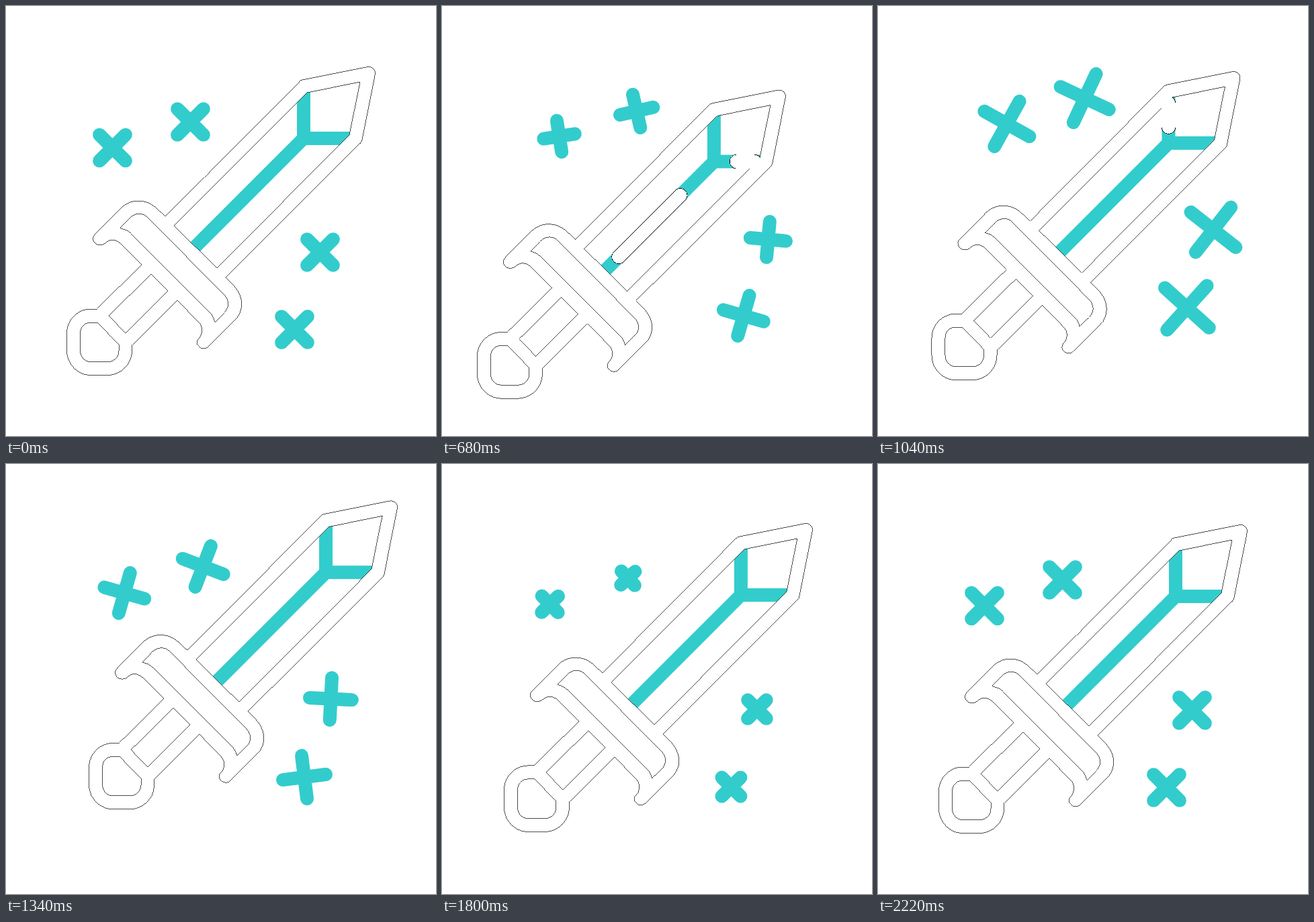
An HTML page for the animation above (2.26 s loop, 640 by 640 pixels).

```html
<!DOCTYPE html>
<html lang="en">
<head>
<meta charset="utf-8">
<title>Sword</title>
<style>
  html, body { margin: 0; width: 100%; height: 100%; overflow: hidden; background: #fff; }
  svg { display: block; width: 100vw; height: 100vh; }
  .teal { fill: none; stroke: #33cccc; stroke-width: 20; }
  .line { fill: none; stroke: #000; stroke-width: .7; shape-rendering: crispEdges; }
  .rim, .glint { fill: none; stroke-linecap: round; stroke-linejoin: round; shape-rendering: crispEdges; }
  .rim { stroke: #000; stroke-width: 21.6; }
  .glint { stroke: #fff; stroke-width: 20.4; }
  .spark { stroke-linecap: round; }
</style>
</head>
<body>
<svg viewBox="0 0 640 640">
  <defs>
    <clipPath id="blade"><path d="M250 327 448 129 527 113 511 192 314 390Z"/></clipPath>
  </defs>
  <g id="sword">
    <g clip-path="url(#blade)">
      <path class="teal" d="M443 120V197H520M270 370 443 197"/>
      <path class="rim" data-glint="0" d="M285 355 443 197"/>
      <path class="rim" data-glint="1" d="M503 197H443V138"/>
    </g>
    <g class="line">
      <!-- blade -->
      <path d="M237 313 436 112.500Q438 110.500 441 110L538 90.700C545 89.500 550.500 95 549.300 102L530 199Q529.500 202 527.500 204L327 404"/>
      <path d="M250 327 448 129 527 113 511 192 314 390Z"/>
      <!-- guard -->
      <path d="M327 404 337 414C354 431 355 453 341 467L301 507C292 515 280 504 286 496C294 488 293 477 287 471L255 438"/>
      <path d="M202 385 172 355C165 348 157 346 150 351C141 360 129 355 129.500 345Q130 342 133 339L168 304C183 286 208 286 224 301L237 313"/>
      <path d="M210 314 325 430C333 439 332 449 325 456L310.500 470Q309 461 302 455L186 339Q179 332 170 330.500L184 316C191 308 203 307 210 314Z"/>
      <!-- grip -->
      <path d="M202 385 136 450M255 438 189 504M216 399 153 461 178 487 241 424Z"/>
      <!-- pommel -->
      <path d="M136 451H126C106 451 90.500 468 90.500 487V513C90.500 533 107 549.500 126 549.500H151C171 549.500 187.500 533 187.500 513L188 504"/>
      <path d="M126 471H136L168 504V513C168 522 161 529.500 152 529.500H126C117 529.500 110.500 522 110.500 513V487C110.500 478 117 471 126 471Z"/>
    </g>
    <path class="glint" data-glint="0" d="M285 355 443 197"/>
    <path class="glint" data-glint="1" d="M503 197H443V138"/>
  </g>
  <g id="sparks"></g>
</svg>
<script>
const LOOP = 2260;
const smooth = (t, a, b) => {
  const x = Math.min(1, Math.max(0, (t - a) / (b - a)));
  return x * x * (3 - 2 * x);
};

// Monotone cubic curve through [time, value] keys, flat at both ends.
function track(keys) {
  const n = keys.length;
  const rise = i => (keys[i + 1][1] - keys[i][1]) / (keys[i + 1][0] - keys[i][0]);
  const slope = keys.map((k, i) => {
    if (i === 0 || i === n - 1) return 0;
    const a = rise(i - 1), b = rise(i);
    return a * b > 0 ? 2 * a * b / (a + b) : 0;
  });
  return t => {
    if (t <= keys[0][0]) return keys[0][1];
    if (t >= keys[n - 1][0]) return keys[n - 1][1];
    let i = 0;
    while (t > keys[i + 1][0]) i++;
    const [t0, v0] = keys[i], [t1, v1] = keys[i + 1];
    const h = t1 - t0, x = (t - t0) / h, y = 1 - x;
    return v0 * y * y * (1 + 2 * x) + v1 * x * x * (3 - 2 * x)
      + h * x * y * (slope[i] * y - slope[i + 1] * x);
  };
}

// Sword: pull back, thrust, settle.
const BACK = 735, THRUST = 1435;
const LOW = [-43, 39], HIGH = [37, -39.5];
const pull = track([[235, 0], [360, 0.102], [540, 0.585], [680, 0.885], [BACK, 1]]);
const settle = track([[THRUST, 1], [1500, 0.82], [1560, 0.64], [1620, 0.453], [1800, 0.053], [1870, 0]]);
function swordAt(t) {
  if (t < BACK) return LOW.map(v => v * pull(t));
  if (t > THRUST) return HIGH.map(v => v * settle(t));
  const p = smooth(t, BACK, THRUST);
  return LOW.map((v, i) => v + (HIGH[i] - v) * p);
}

// Glints: path length, head start/end, tail start/end.
const glints = [
  { len: 223, head: [500, 790], tail: [630, 885] },
  { len: 119, head: [560, 960], tail: [800, 1175] }
];

// Sparks: dip = time of smallest size, top = time of widest turn, rest = end of turn.
const sparks = [
  { x: 158.5, y: 211, dip: 460, top: 1160, rest: 1840, low: 1710,
    turn: [-65, -54, -16, -8, -29], size: [14.9, 23.5, 38.4, 39.2, 31.2, 17.2], move: [4, 17, 35.5, 36.3, 19, 2.3] },
  { x: 274.5, y: 172.5, dip: 480, top: 1180, rest: 1860, low: 1740,
    turn: [-58, -58, -20, -10, -24], size: [17.9, 25.2, 39.8, 40.6, 32.6, 14.5], move: [3.3, 16, 35.3, 36.3, 20, 2.5] },
  { x: 467.5, y: 366.5, dip: 415, top: 1110, rest: 1740, low: 1670,
    turn: [-79, -40, -7, -3, -42], size: [13.9, 26.6, 42.4, 43, 31.5, 19.5], move: [5.2, 19, 33.5, 34, 17, 1.5] },
  { x: 429.5, y: 481.5, dip: 400, top: 1090, rest: 1700, low: 1650,
    turn: [-83, -29, -3, -1, -52], size: [13, 31.2, 44.3, 44.8, 32.3, 19.7], move: [6, 20.5, 32.3, 32.6, 15.5, 1] }
];
const svgNS = "http://www.w3.org/2000/svg";
for (const s of sparks) {
  const [a, b, c, d, e] = s.turn, [f, g, h, i, j, k] = s.size, [l, m, n, o, p, q] = s.move;
  s.turnAt = track([[0, 0], [360, a], [s.dip, -90], [680, b], [1040, c], [s.top, d], [1340, e], [s.rest, -90]]);
  s.sizeAt = track([[0, 27.4], [360, f], [s.dip, 12], [680, g], [1040, h], [1080, i], [1340, j], [s.low, 12], [1800, k], [2120, 27.4]]);
  s.moveAt = track([[60, 0], [360, l], [680, m], [1040, n], [1075, o], [1340, p], [1800, q], [1960, 0]]);
  s.el = document.createElementNS(svgNS, "path");
  s.el.setAttribute("class", "teal spark");
  document.getElementById("sparks").append(s.el);
}

const sword = document.getElementById("sword");
const glintEls = [...document.querySelectorAll("[data-glint]")];

function draw(t) {
  sword.setAttribute("transform", `translate(${swordAt(t)})`);
  for (const el of glintEls) {
    const { len, head, tail } = glints[el.dataset.glint];
    const from = len * smooth(t, ...tail), span = len * smooth(t, ...head) - from;
    el.style.display = span > 0.5 ? "" : "none";
    el.setAttribute("stroke-dasharray", `${Math.max(span, 0)} 9999`);
    el.setAttribute("stroke-dashoffset", -from);
  }
  for (const s of sparks) {
    const r = s.sizeAt(t), m = s.moveAt(t);
    s.el.setAttribute("d", `M${-r} 0H${r}M0 ${-r}V${r}`);
    s.el.setAttribute("transform", `translate(${s.x + 0.94 * m} ${s.y - m}) rotate(${45 + s.turnAt(t)})`);
  }
}

const start = performance.now();
function frame() {
  draw((performance.now() - start) % LOOP);
  requestAnimationFrame(frame);
}
frame();
</script>
</body>
</html>
```
